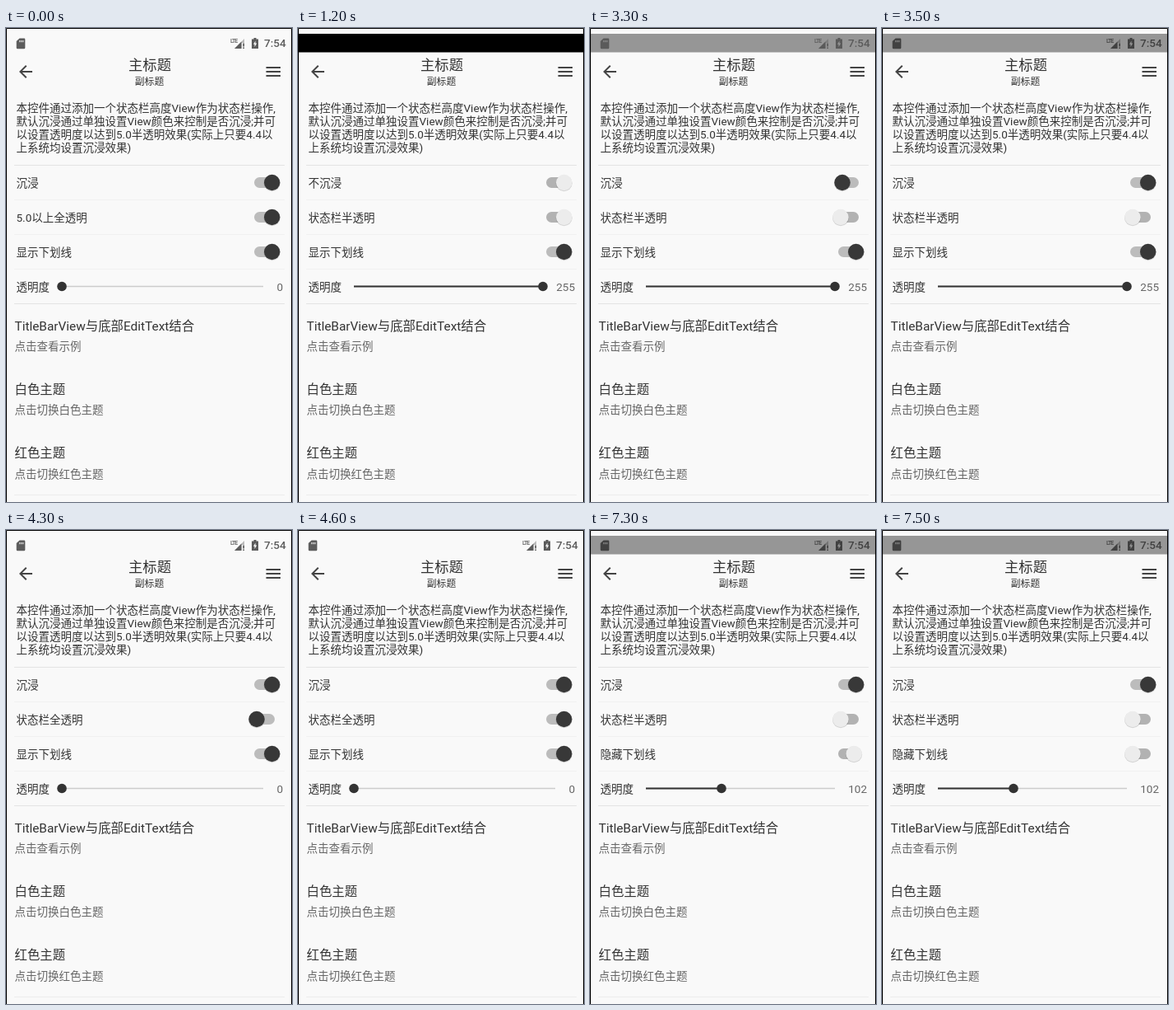
Recreate the animation shown at these times as an HTML page. Size 348 px wide and 575 px high, loop 8000 ms.

```html
<!DOCTYPE html>
<html lang="zh-CN">
<head>
<meta charset="utf-8">
<style>
  html, body { margin: 0; width: 100%; height: 100%; overflow: hidden; background: #f9f9f9; }
  svg { display: block; width: 348px; height: 575px; }
  text { font: 13.5px Roboto, "Noto Sans CJK SC", "Noto Sans CJK", sans-serif; fill: #333; white-space: pre; }
  .title { font-size: 17.3px; text-anchor: middle; }
  .subtitle { font-size: 11.8px; text-anchor: middle; }
  .head { font-size: 15.4px; }
  .note { fill: #666; }
  .value { text-anchor: end; fill: #666; }
  #icons text { fill: inherit; font-weight: 500; }
  #icons .lte { font-size: 7px; letter-spacing: -1px; }
</style>
</head>
<body>
<svg id="stage" viewBox="0 0 348 575">
  <rect width="348" height="575" fill="#f9f9f9"/>
  <rect id="bar" x="1" y="7" width="346" height="22.5"/>
  <g id="icons">
    <path fill-rule="evenodd" d="M16.500 12.500H22q1.300 0 1.300 1.300V24q0 1.200-1.300 1.200H14q-1.300 0-1.300-1.200V16zM16.300 15v2.200h1V15zm2 0v2.200h1V15zm2 0v2.200h1V15z"/>
    <text class="lte" x="273" y="17.500">LTE</text>
    <path opacity=".4" d="M290 13V18H286.500V25H278z"/>
    <path d="M286.500 16.500V25H278z"/>
    <path d="M288.300 18.500h1.700v4h-1.700zm0 5h1.700V25h-1.700z"/>
    <path fill-rule="evenodd" d="M301.500 12h3v1.500H307V25H299V13.500h2.500zM303.500 15.500l-2.500 4.300h1.500v3.200l2.700-4.500h-1.700z"/>
    <text x="314" y="23">7:54</text>
  </g>
  <path transform="translate(12 41)" fill="#444" d="M20 11H7.800l5.600-5.600L12 4l-8 8 8 8 1.400-1.400L7.800 13H20z"/>
  <path d="M316.500 48h17.500m-17.500 5h17.500m-17.500 5h17.500" stroke="#444" stroke-width="2"/>
  <text class="title" x="175" y="51">主标题</text>
  <text class="subtitle" x="174.500" y="69">副标题</text>
  <path d="M10 166.500h329M10 334.500h329" stroke="#e4e4e4"/>
  <path d="M10 566.500h329" stroke="#ececec"/>
  <path d="M10 208.500h329M10 250.500h329M10 292.500h329" stroke="#f1f1f1"/>
  <g id="content"></g>
  <text x="12.500" y="318.500">透明度</text>
  <path id="rail" stroke="#ccc" stroke-width="1.500"/>
  <path id="fill" stroke="#333" stroke-width="2"/>
  <circle id="knob" cy="313.500" r="5.800" fill="#333"/>
  <text id="value" class="value" x="337" y="318.500"></text>
  <path d="M.5 575V.5H347.500V575" fill="none" stroke="#000"/>
</svg>
<script>
const LOOP = 8000, STEP = 100, SLIDE = 250;
const $ = id => document.getElementById(id);
const content = $('content');

function add(tag, attrs, text = '') {
  const el = document.createElementNS('http://www.w3.org/2000/svg', tag);
  for (const key in attrs) el.setAttribute(key, attrs[key]);
  el.textContent = text;
  content.append(el);
  return el;
}

[
  '本控件通过添加一个状态栏高度View作为状态栏操作,',
  '默认沉浸通过单独设置View颜色来控制是否沉浸;并可',
  '以设置透明度以达到5.0半透明效果(实际上只要4.4以',
  '上系统均设置沉浸效果)'
].forEach((line, i) => add('text', { x: 12.5, y: 102 + 16 * i }, line));

[
  ['TitleBarView与底部EditText结合', '点击查看示例'],
  ['白色主题', '点击切换白色主题'],
  ['红色主题', '点击切换红色主题']
].forEach(([head, note], i) => {
  add('text', { class: 'head', x: 10.5, y: 366.5 + 77.3 * i }, head);
  add('text', { class: 'note', x: 10.5, y: 391 + 77.3 * i }, note);
});

// Each switch: [toggle time, checked, label]
const switches = [
  [[-LOOP, 1, '沉浸'], [1200, 0, '不沉浸'], [3247, 1, '沉浸']],
  [[-LOOP, 1, '5.0以上全透明'], [1200, 0, '状态栏半透明'], [4300, 1, '状态栏全透明'], [5730, 0, '状态栏半透明']],
  [[-LOOP, 1, '显示下划线'], [7240, 0, '隐藏下划线']]
].map((events, i) => {
  const y = 187.5 + 42 * i;
  return {
    events,
    label: add('text', { x: 12.5, y: y + 5 }),
    track: add('rect', { x: 302, y: y - 6.5, width: 25, height: 13, rx: 6.5 }),
    shadow: add('circle', { cy: y + .8, r: 10, fill: '#000', opacity: .15 }),
    thumb: add('circle', { cy: y, r: 9.7 })
  };
});

// [time, value]
const alphas = [[0, 0], [1200, 255], [4300, 0], [5800, 102]];
const bars = [[0, 0], [1200, 1], [3300, .4], [4300, 0], [5800, .4]];
const tints = [[0, '#5c5c5c'], [1200, '#000'], [1300, '#fff'], [3300, '#5a5a5a'], [3400, '#414141'],
  [4300, '#5c5c5c'], [5800, '#414141']];
const latest = (list, t) => list.filter(e => e[0] <= t).pop();

function drawSwitch({ events, label, track, shadow, thumb }, t) {
  const [start, on, text] = latest(events, t);
  const p = Math.min((t - start) / SLIDE, 1);
  const ease = (1 - Math.cos(Math.PI * p)) / 2;
  const x = 305 + 18.7 * (on ? ease : 1 - ease);
  label.textContent = text;
  track.setAttribute('fill', on ? '#bcbcbc' : '#b2b2b2');
  thumb.setAttribute('fill', on ? '#383838' : '#ececec');
  thumb.setAttribute('cx', x);
  shadow.setAttribute('cx', x);
}

function drawSlider(alpha) {
  const end = alpha ? 298 : 313;
  const x = 68 + (end - 68) * alpha / 255;
  $('rail').setAttribute('d', `M68 313.500H${end}`);
  $('fill').setAttribute('d', `M68 313.500H${x}`);
  $('knob').setAttribute('cx', x);
  $('value').textContent = alpha;
}

function draw(now) {
  const t = Math.floor(now % LOOP / STEP) * STEP;
  switches.forEach(s => drawSwitch(s, t));
  drawSlider(latest(alphas, t)[1]);
  $('bar').setAttribute('opacity', latest(bars, t)[1]);
  $('icons').setAttribute('fill', latest(tints, t)[1]);
}

const begin = performance.now();
function frame() {
  draw(performance.now() - begin);
  requestAnimationFrame(frame);
}
frame();
</script>
</body>
</html>
```
